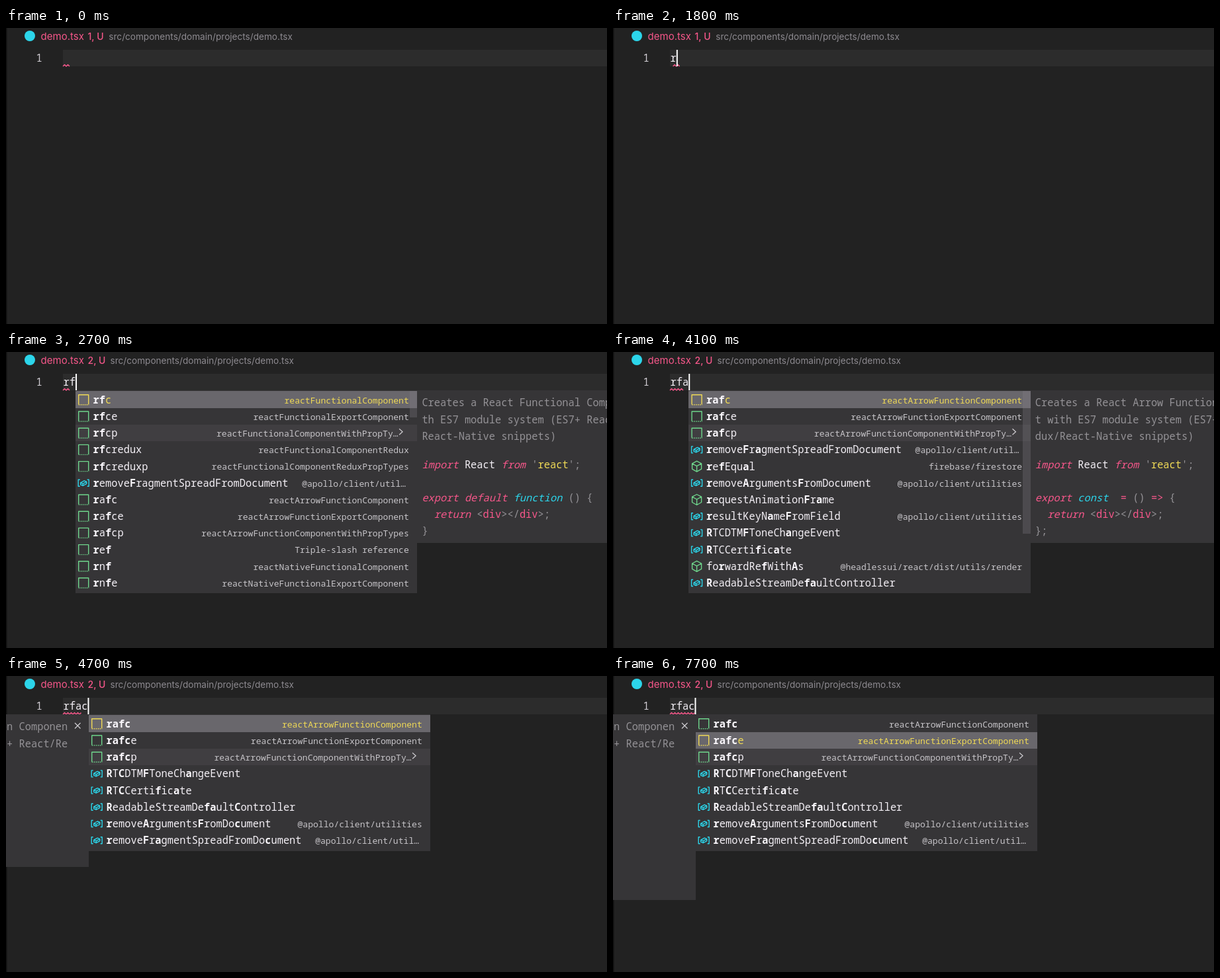
An HTML page that plays this animation: 908x448 px, repeating every 8000 ms.

```html
<!DOCTYPE html>
<html lang="en">
<head>
<meta charset="utf-8">
<title>Editor completion</title>
<style>
html, body { margin: 0; width: 100%; height: 100%; overflow: hidden; background: #222; }
svg { display: block; width: 908px; height: 448px; }
text { white-space: pre; }
.ui { font-family: Inter, Roboto, sans-serif; }
.code { font: 15.36px "Noto Sans Mono", "DejaVu Sans Mono", monospace; fill: #f4f0f6; }
.main { font-weight: 500; }
.detail { font-size: 13.08px; fill: #c6c4c8; text-anchor: end; }
.doc { fill: #949296; }
.hit { font-weight: 600; fill: #fbf8fd; }
.key { fill: #f6578a; font-style: italic; }
.tag { fill: #f6578a; }
.type { fill: #2cd5ea; font-style: italic; }
.str { fill: #efd956; }
.name { fill: #f4f0f6; }
.icon { fill: none; stroke-width: 1.4; stroke-linejoin: round; }
</style>
</head>
<body>
<svg id="stage" viewBox="0 0 908 448"></svg>
<script>
const stage = document.getElementById('stage');
const LOOP = 8000, CHAR = 9.22, LEFT = 86.6, ROW = 25.2, FIRST = 72.3, WIDTH = 516.8;
const PINK = '#f6578a', CYAN = '#2cd5ea', GREEN = '#6fd68c', YELLOW = '#efd956', ORANGE = '#f7924f';

const esc = s => s.replace(/&/g, '&amp;').replace(/</g, '&lt;').replace(/>/g, '&gt;');
const rect = (x, y, w, h, fill, extra = '') =>
  `<rect x="${x}" y="${y}" width="${w}" height="${h}" fill="${fill}" ${extra}/>`;
// Box given by its edges, snapped to whole pixels.
const box = (left, top, right, bottom, fill, extra) => {
  const [l, t, r, b] = [left, top, right, bottom].map(Math.round);
  return rect(l, t, r - l, b - t, fill, extra);
};
const text = (x, y, cls, body, extra = '') =>
  `<text x="${x}" y="${y}" class="${cls}" ${extra}>${body}</text>`;
const span = (cls, s) => `<tspan class="${cls}">${esc(s)}</tspan>`;

// Row: icon kind, label, detail, struck out. A trailing ellipsis marks a cut detail.
const util = '@apollo/client/utilities', cut = '@apollo/client/util…';
const rafRows = [
  ['snip', 'rafc', 'reactArrowFunctionComponent'],
  ['snip', 'rafce', 'reactArrowFunctionExportComponent'],
  ['snip', 'rafcp', 'reactArrowFunctionComponentWithPropTy…']
];
const lists = {
  r: [
    ['mod', 'R'], ['key', 'readonly'], ['cube', 'removeEventListener'],
    ['cube', 'requestAnimationFrame'], ['cube', 'requestIdleCallback'], ['mod', 'require'],
    ['cube', 'resizeBy'], ['cube', 'resizeTo'], ['key', 'return'],
    ['cube', 'releaseEvents', '', true], ['tool', 'ri:a'], ['tool', 'ri:art']
  ],
  rf: [
    ['snip', 'rfc', 'reactFunctionalComponent'],
    ['snip', 'rfce', 'reactFunctionalExportComponent'],
    ['snip', 'rfcp', 'reactFunctionalComponentWithPropTy…'],
    ['snip', 'rfcredux', 'reactFunctionalComponentRedux'],
    ['snip', 'rfcreduxp', 'reactFunctionalComponentReduxPropTypes'],
    ['mod', 'removeFragmentSpreadFromDocument', cut],
    ['snip', 'rafc', 'reactArrowFunctionComponent'],
    ['snip', 'rafce', 'reactArrowFunctionExportComponent'],
    ['snip', 'rafcp', 'reactArrowFunctionComponentWithPropTypes'],
    ['snip', 'ref', 'Triple-slash reference'],
    ['snip', 'rnf', 'reactNativeFunctionalComponent'],
    ['snip', 'rnfe', 'reactNativeFunctionalExportComponent']
  ],
  rfa: [
    ...rafRows,
    ['mod', 'removeFragmentSpreadFromDocument', cut],
    ['cube', 'refEqual', 'firebase/firestore'],
    ['mod', 'removeArgumentsFromDocument', util],
    ['cube', 'requestAnimationFrame'],
    ['mod', 'resultKeyNameFromField', util],
    ['mod', 'RTCDTMFToneChangeEvent'], ['mod', 'RTCCertificate'],
    ['cube', 'forwardRefWithAs', '@headlessui/react/dist/utils/render'],
    ['mod', 'ReadableStreamDefaultController']
  ],
  rfac: [
    ...rafRows,
    ['mod', 'RTCDTMFToneChangeEvent'], ['mod', 'RTCCertificate'],
    ['mod', 'ReadableStreamDefaultController'],
    ['mod', 'removeArgumentsFromDocument', util],
    ['mod', 'removeFragmentSpreadFromDocument', cut]
  ]
};
const popupX = { r: 96, rf: 104.6, rfa: 114, rfac: 124.6 };
const thumbEnd = { r: 85, rf: 99, rfa: 275 };

const importLine = span('key', 'import') + span('name', ' React ') + span('key', 'from') +
  " '" + span('str', 'react') + "';";
const returnLine = span('key', '  return ') + '&lt;' + span('tag', 'div') + '&gt;&lt;/' +
  span('tag', 'div') + '&gt;;';
const arrowIntro = ['Creates a React Arrow Function Componen',
  't with ES7 module system (ES7+ React/Re', 'dux/React-Native snippets)'];
const arrowCode = [importLine, '',
  span('key', 'export ') + span('type', 'const') + '  ' + span('tag', '=') + ' () ' + span('tag', '=>') + ' {',
  returnLine, '};'];
const docs = {
  r: { intro: ['export namespace R'], code: [], bottom: 111 },
  rf: {
    intro: ['Creates a React Functional Component wi',
      'th ES7 module system (ES7+ React/Redux/', 'React-Native snippets)'],
    code: [importLine, '', span('key', 'export default ') + span('type', 'function') + ' () {', returnLine, '}'],
    bottom: 289
  },
  rfa: { intro: arrowIntro, code: arrowCode, bottom: 289 }
};

// time, typed text, squiggle start and end in columns, problems, caret, popup, selected row
const steps = [
  [0, '', 0, 1, 1, 0],
  [400, '', 0, 1, 1, 1],
  [900, 'r', .5, 1.5, 1, 1],
  [1300, 'r', 0, 1, 2, 1],
  [1400, '', 0, 1, 2, 1],
  [1700, '', 0, 1, 1, 1],
  [1800, 'r', .5, 1.5, 1, 1],
  [2000, 'r', 0, 1, 1, 1, 'r', 0],
  [2200, 'r', 0, 1, 2, 1, 'r', 0],
  [2300, 'r', 0, 1, 2, 0, 'r', 0],
  [2600, 'rf', 0, 1, 2, 1, 'rf', 0],
  [3000, 'rf', 0, 2, 2, 1, 'rf', 0],
  [3100, 'rf', 0, 2, 2, 0, 'rf', 0],
  [3600, 'rf', 0, 2, 2, 1, 'rf', 0],
  [4100, 'rfa', 0, 2, 2, 1, 'rfa', 0],
  [4500, 'rfa', 0, 3, 2, 1, 'rfa', 0],
  [4600, 'rfa', 0, 3, 2, 0, 'rfa', 0],
  [4700, 'rfac', 0, 3, 2, 1, 'rfac', 0],
  [5100, 'rfac', 0, 4, 2, 1, 'rfac', 0],
  [5200, 'rfac', 0, 4, 2, 0, 'rfac', 0],
  [5700, 'rfac', 0, 4, 2, 1, 'rfac', 0],
  [6200, 'rfac', 0, 4, 2, 0, 'rfac', 0],
  [6700, 'rfac', 0, 4, 2, 1, 'rfac', 0],
  [7200, 'rfac', 0, 4, 2, 0, 'rfac', 0],
  [7400, 'rfac', 0, 4, 2, 0, 'rfac', 1],
  [7700, 'rfac', 0, 4, 2, 1, 'rfac', 1]
];

const shapes = {
  snip: [GREEN, '<path d="M-7.5 7V-7.5H7.5V7"/><path d="M-7.5 7.5H8" stroke-dasharray="1.5 1.5"/>'],
  mod: [CYAN, '<path d="M-5.5-5H-8V5H-5.5M5.5-5H8V5H5.5M-4.5-.5L1-3.5L4.5-2V1L-1 4L-4.5 2.5ZM-4.5-.5L-1 1L4.5-2M-1 1V4"/>'],
  cube: [GREEN, '<path d="M0-8L7-4.3V4L0 8L-7 4V-4.3ZM-7-4.3L0-.5L7-4.3M0-.5V8"/>'],
  key: [PINK, '<path d="M-8-6H1M4-6H8M-8-2H-3M0-2H8M-8 2H3M6 2H8M-8 6H-1M2 6H8" stroke-width="1.6"/>'],
  tool: [ORANGE, '<path d="M7.5-4.5L4.5-2L2-4.2L4.5-7.5C1-8.5-2-5.5-1-2L-7.5 4.5C-8.5 6-6 8.5-4.5 7.3L2 1C5.5 2 8.5-1 7.5-4.5Z"/>']
};
function icon(kind, x, y, lit) {
  const [color, body] = shapes[kind];
  return `<g class="icon" stroke="${lit ? YELLOW : color}" transform="translate(${x} ${y})">${body}</g>`;
}

// Marks the typed letters in a label, in order where possible.
function marked(label, query) {
  const low = label.toLowerCase(), hits = new Set();
  let from = 0;
  for (const c of query) {
    let i = low.indexOf(c, from);
    if (i < 0) i = low.indexOf(c);
    if (i < 0) continue;
    hits.add(i);
    from = i + 1;
  }
  return [...label].map((c, i) => hits.has(i) ? span('hit', c) : esc(c)).join('');
}

function squiggle(a, b) {
  const x = LEFT - .6 + a * CHAR, end = LEFT + .4 + b * CHAR;
  let d = `M${x} 58`;
  for (let i = 1; x + i * 2.5 <= end + 1; i++) d += `L${x + i * 2.5} ${i % 2 ? 55.6 : 58}`;
  return `<path d="${d}" fill="none" stroke="${PINK}" stroke-width="1.5" stroke-linejoin="round"/>`;
}

function docPanel(name, sel) {
  const onLeft = name === 'rfac';
  const { intro, code, bottom } = docs[onLeft ? 'rfa' : name];
  const x = onLeft ? 0 : popupX[name] + WIDTH;
  const tx = onLeft ? 93.4 - 39 * CHAR : x + 7;
  let out = box(x, 58, onLeft ? popupX.rfac : 908, bottom + (sel ? 50 : 0), '#363537');
  intro.forEach((s, i) => out += text(tx, 82.3 + i * ROW, 'code doc', esc(s)));
  code.forEach((s, i) => out += text(tx, 176.3 + i * 25, 'code doc', s));
  if (onLeft) out += '<path d="M104 71L112.5 79.5M112.5 71L104 79.5" stroke="#d0ced2" stroke-width="1.2"/>';
  return out;
}

function popup(name, sel) {
  const x = popupX[name], right = x + WIDTH, rows = lists[name];
  let out = docPanel(name, sel) + box(x, 58, right, 62.95 + rows.length * ROW, '#363537');
  rows.forEach(([kind, label, detail = '', old], i) => {
    const y = FIRST + i * ROW, base = y + 5.4, lit = i === sel, hover = i === 2;
    if (lit || hover) out += box(x, y - 12.9, right, y + 12.6, lit ? '#69676c' : '#403e41');
    out += icon(kind, x + 12.6, y, lit);
    const tint = lit ? `style="fill:${YELLOW}"` : '';
    const style = old ? 'style="fill:#939195;text-decoration:line-through"' : tint;
    out += text(x + 27, base, 'code main', old ? esc(label) : marked(label, name), style);
    if (!detail) return;
    const end = x + (hover ? 488 : detail.endsWith('…') ? 499.5 : 504.2);
    out += text(end, base - .2, 'code detail', esc(detail), tint);
    if (hover) out += `<path d="M${x + 489.5} ${y - 6.5}l5 4.5l-5 4.5" fill="none" stroke="#d0ced2" stroke-width="1.2"/>`;
  });
  if (thumbEnd[name]) out += box(x + 505, 59, right, thumbEnd[name], '#858388', 'opacity=".28"');
  return out;
}

function draw([, typed, a, b, issues, caret, list, sel]) {
  const shift = issues === 2 ? 2.2 : 0;
  let out = rect(0, 0, 908, 448, '#222') + rect(0, 0, 1.5, 448, '#111') +
    `<circle cx="36" cy="12" r="8" fill="${CYAN}"/>` +
    text(52.6, 18, 'ui', 'demo.tsx', `font-size="15" fill="${PINK}"`) +
    text(123.5, 17.6, 'ui', issues + ', U', `font-size="14" font-weight="500" fill="${PINK}"`) +
    text(155.3 + shift, 18, 'ui', 'src/components/domain/projects/demo.tsx', 'font-size="13.6" fill="#8d8a90"') +
    rect(86, 33, 822, 25, '#2c2c2c') +
    text(45.5, 51.4, 'code', '1', 'style="fill:#cfccd2"') +
    text(LEFT, 51.4, 'code main', typed) + squiggle(a, b);
  if (list) out += popup(list, sel);
  if (caret) out += rect(LEFT + typed.length * CHAR, 33, 2, 25, '#fff');
  stage.innerHTML = out;
}

let shown = null;
const start = performance.now();
function tick() {
  const t = (performance.now() - start) % LOOP;
  const step = steps.findLast(s => s[0] <= t) || steps[0];
  if (step !== shown) draw(shown = step);
  requestAnimationFrame(tick);
}
tick();
</script>
</body>
</html>
```
